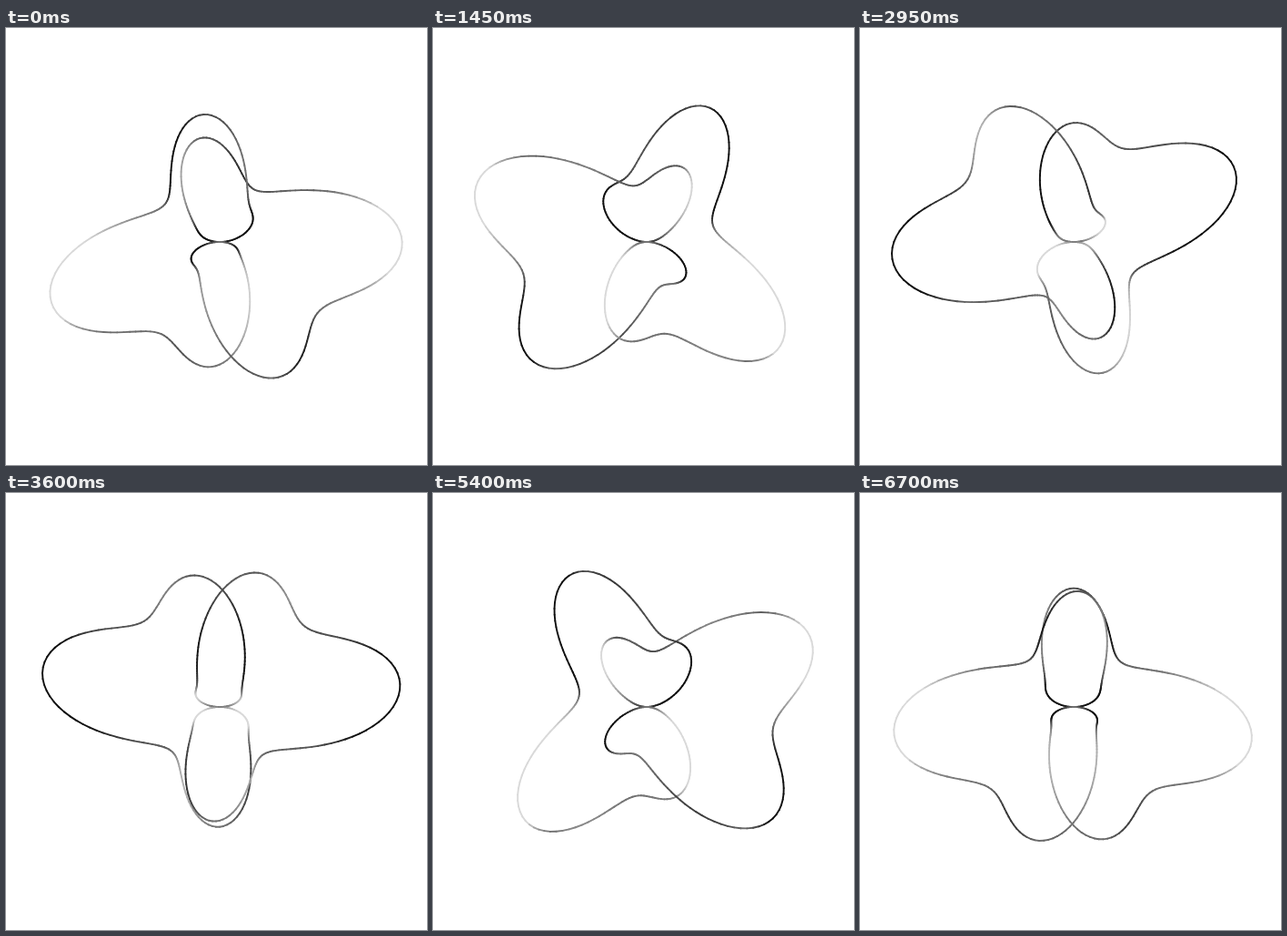
Write an HTML page that moves like this. It is 463 px wide and 480 px high and loops after 6.75 s.

```html
<!DOCTYPE html>
<html lang="en">
<head>
<meta charset="utf-8">
<title>Rippling spherical curve</title>
<style>
  html, body { margin: 0; width: 100%; height: 100%; overflow: hidden; background: #fff; }
  svg { display: block; width: 463px; height: 480px; }
</style>
</head>
<body>
<svg id="stage" viewBox="0 0 463 480" fill="none" stroke-width="1.9" stroke-linecap="round"></svg>
<script>
const SVG_NS = "http://www.w3.org/2000/svg";
const STEP_MS = 50;
const STEPS = 135;
const STEP_ANGLE = 0.05;
const START_ANGLE = -0.37;
const SEGMENTS = 400;
const CENTER = 235;

const stage = document.getElementById("stage");
const segments = Array.from({ length: SEGMENTS }, () =>
  stage.appendChild(document.createElementNS(SVG_NS, "line")));

// Top view of a curve with latitude t and longitude 2t on a sphere
// whose radius ripples with a travelling wave of four cycles.
function pointAt(t, phase) {
  const s = Math.sin(4 * t + phase);
  const c = Math.cos(t);
  const radius = 179.5 + 5 * c * c - c * (78 * s - 45 * s ** 3) - 76 * s * s;
  return {
    x: CENTER + radius * c * Math.cos(2 * t),
    y: CENTER - radius * c * Math.sin(2 * t)
  };
}

// The light comes from the side, so level stretches stay mid grey.
function shadeAt(t, phase, steepness) {
  const tilt = Math.cos(4 * t + phase) * Math.cos(2 * t) * steepness;
  const light = 0.38 + 0.9 * tilt - 0.1 * Math.sin(t);
  const level = Math.round(255 * Math.min(0.85, Math.max(0.06, light)));
  return `rgb(${level},${level},${level})`;
}

function draw(step) {
  const phase = START_ANGLE + STEP_ANGLE * step;
  const dt = 2 * Math.PI / SEGMENTS;
  let from = pointAt(0, phase);
  segments.forEach((line, i) => {
    const to = pointAt((i + 1) * dt, phase);
    const steepness = Math.abs(to.y - from.y) / Math.hypot(to.x - from.x, to.y - from.y);
    line.setAttribute("x1", from.x.toFixed(2));
    line.setAttribute("y1", from.y.toFixed(2));
    line.setAttribute("x2", to.x.toFixed(2));
    line.setAttribute("y2", to.y.toFixed(2));
    line.setAttribute("stroke", shadeAt((i + 0.5) * dt, phase, steepness));
    from = to;
  });
}

const start = performance.now();
let shown = -1;

function tick() {
  const step = Math.floor((performance.now() - start) / STEP_MS) % STEPS;
  if (step !== shown) draw(shown = step);
  requestAnimationFrame(tick);
}
tick();
</script>
</body>
</html>
```
